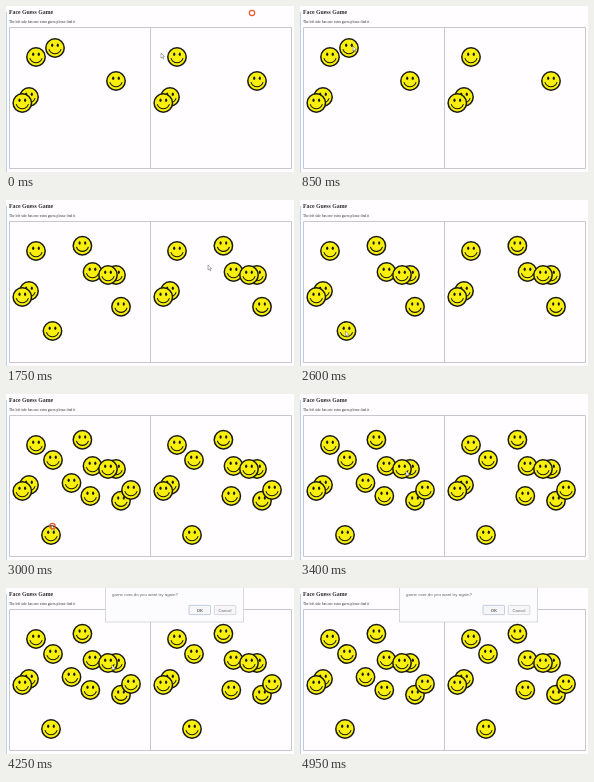
These frames come from a looping animation (288 by 166 pixels, 5 s). An HTML page:

```html
<!DOCTYPE html>
<html lang="en">
<head>
<meta charset="utf-8">
<title>Face Guess Game</title>
<style>
  html, body { margin: 0; width: 100%; height: 100%; overflow: hidden; background: #fffdff; }
  svg { display: block; width: 100%; height: 100%; }
  .serif { font-family: "Liberation Serif", serif; fill: #2c2c2c; }
  .sans { font-family: "Liberation Sans", sans-serif; fill: #666; }
</style>
</head>
<body>
<svg viewBox="0 0 288 166">
  <defs>
    <g id="face">
      <circle r="9.2" fill="#f8f00c" stroke="#1a1a12" stroke-width="1.5"/>
      <ellipse cx="-2.8" cy="-2.7" rx="1.1" ry="1.8" fill="#1a1a12"/>
      <ellipse cx="2.8" cy="-2.7" rx="1.1" ry="1.8" fill="#1a1a12"/>
      <path d="M-5.9 1.6Q-4.2 5.7 0 5.7T5.9 1.6" fill="none" stroke="#1a1a12" stroke-width="1.1" stroke-linecap="round"/>
    </g>
  </defs>
  <rect width="288" height="166" fill="#fffdff"/>
  <rect y="6" width="1" height="160" fill="#b5d3ea"/>
  <text class="serif" x="3" y="8.3" font-size="5.8" font-weight="bold">Face Guess Game</text>
  <text class="serif" x="3" y="17" font-size="3.6">The left side has one extra guess please find it</text>
  <path d="M3.5 21.5H285.5V162.5H3.5ZM144.5 21.5V162.5" fill="none" stroke="#c2c0c9" stroke-width=".9"/>
  <g id="rounds"></g>
  <g id="dialog">
    <rect x="99.5" y="-3" width="138" height="37" fill="#fcfbfd" stroke="#c8c7cb" stroke-width=".7"/>
    <text class="sans" x="106" y="8.4" font-size="4.4">game over,do you want try again?</text>
    <g fill="#f6f6f8" stroke-width=".6">
      <rect x="183" y="17.4" width="21.5" height="9.2" rx=".8" stroke="#9db4cc"/>
      <rect x="208.3" y="17.4" width="21.5" height="9.2" rx=".8" stroke="#c4c4c8"/>
    </g>
    <g class="sans" font-size="4.2" text-anchor="middle">
      <text x="193.8" y="23.6" font-weight="bold">OK</text>
      <text x="219" y="23.6">Cancel</text>
    </g>
  </g>
  <path id="cursor" d="M0 0V5L1.2 4L2.1 5.8L2.9 5.4L2.1 3.7H3.6Z" fill="#fff" stroke="#555" stroke-width=".45"/>
  <circle id="ring" r="2.7" fill="none" stroke="#f0582f" stroke-width="1.2"/>
</svg>
<script>
const LOOP = 5000, STEP = 50, PANEL = 141, RING_TIME = 200;
const $ = id => document.getElementById(id);

// Each round keeps earlier faces, adds its own, and hides one extra on the left.
const rounds = [
  { start: 0, added: [[30, 51], [23, 91], [16.3, 97], [110, 75]], extra: [49, 42] },
  { start: 1000, added: [[76.4, 45.7], [86.5, 72], [102, 75], [115, 106.7]], extra: [46.5, 131] },
  { start: 2900, added: [[47, 66], [84.3, 102], [125, 96], [45, 141]], extra: [65.5, 89] }
];
const dialog = { start: 3700, fade: 200 };

const moves = [
  { from: 0, to: 500, at: [53, 40] },
  { from: 1200, to: 1750, at: [202, 65] },
  { from: 1800, to: 2500, at: [45.5, 131] },
  { from: 3000, to: 3400, at: [106, 77] },
  { from: 4700, to: 4950, at: [264, -8] }
];
const entry = [155, 47], restart = [246, 7];

const use = ([x, y]) => `<use href="#face" x="${x}" y="${y}"/>`;
const shared = [];
$("rounds").innerHTML = rounds.map(({ added, extra }) => {
  shared.push(...added);
  const right = shared.map(([x, y]) => [x + PANEL, y]);
  return `<g>${[...shared, extra, ...right].map(use).join("")}</g>`;
}).join("");
const groups = [...$("rounds").children];

const clamp = v => Math.max(0, Math.min(1, v));
const ease = v => v * v * (3 - 2 * v);
const show = (el, on) => el.setAttribute("visibility", on ? "visible" : "hidden");
const place = (el, point) => el.setAttribute("transform", `translate(${point})`);

const cursorAt = t => moves.reduce((pos, { from, to, at }) => {
  const k = ease(clamp((t - from) / (to - from)));
  return pos.map((p, i) => p + (at[i] - p) * k);
}, entry);

// Every round and the dialog begin with a click.
const clicks = [...rounds, dialog].map(({ start }) => start);

function draw(t) {
  const current = rounds.filter(r => r.start <= t).length - 1;
  groups.forEach((g, i) => show(g, i === current));

  place($("cursor"), cursorAt(t));

  const click = clicks.find(c => t >= c && t < c + RING_TIME);
  show($("ring"), click !== undefined);
  place($("ring"), click ? cursorAt(click).map(v => v + 1) : restart);

  const k = clamp((t - dialog.start) / dialog.fade), size = 0.94 + 0.06 * k;
  $("dialog").setAttribute("opacity", k ** 1.4);
  $("dialog").setAttribute("transform", `translate(168.5 15.5) scale(${size}) translate(-168.5 -15.5)`);
}

const begin = performance.now();
function tick() {
  const t = (performance.now() - begin) % LOOP;
  draw(Math.floor(t / STEP) * STEP);
  requestAnimationFrame(tick);
}
tick();
</script>
</body>
</html>
```
